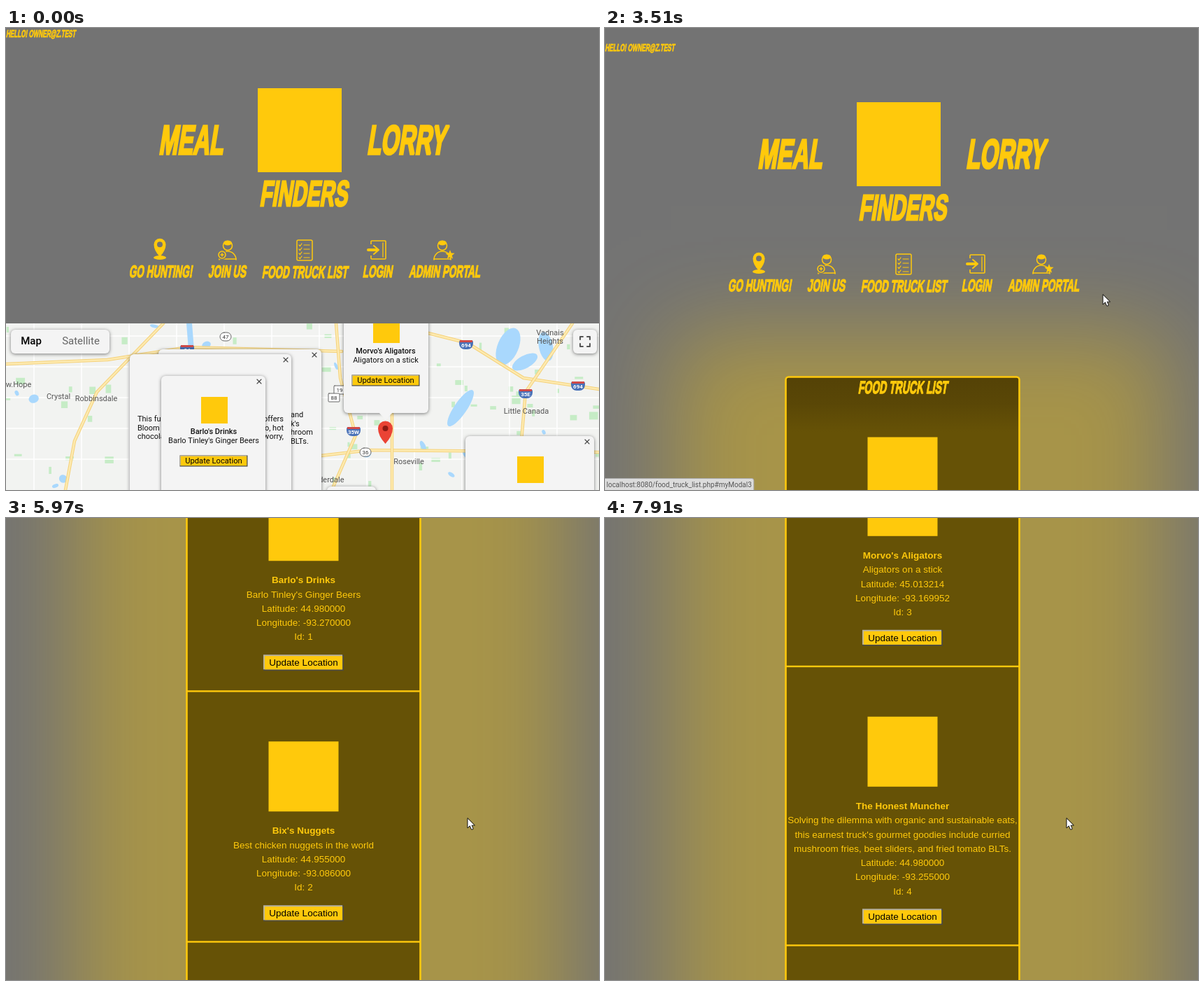
An HTML page with a canvas for the animation above (8 s loop, 848x660 px).

```html
<!DOCTYPE html>
<html lang="en">
<head>
<meta charset="utf-8">
<title>Truck list</title>
<style>
html, body { margin: 0; width: 100%; height: 100%; overflow: hidden; background: #737373; }
canvas { display: block; }
</style>
</head>
<body>
<canvas id="stage" width="848" height="660"></canvas>
<script>
const ctx = document.getElementById('stage').getContext('2d');
const W = 848, H = 660, LOOP = 8000, MAP_TOP = 422;
const YELLOW = '#ffc90c', GREY = '#737373', PAPER = '#f4f4f4', WATER = '#a9d8fd';
const SANS = '"Liberation Sans", Arial, sans-serif';
const UI = 'Roboto, sans-serif';

const trucks = [
  { name: "Barlo's Drinks", about: ["Barlo Tinley's Ginger Beers"], at: '44.980000 -93.270000' },
  { name: "Bix's Nuggets", about: ['Best chicken nuggets in the world'], at: '44.955000 -93.086000' },
  { name: "Morvo's Aligators", about: ['Aligators on a stick'], at: '45.013214 -93.169952' },
  { name: 'The Honest Muncher', about: ['Solving the dilemma with organic and sustainable eats,',
    "this earnest truck's gourmet goodies include curried",
    'mushroom fries, beet sliders, and fried tomato BLTs.'], at: '44.980000 -93.255000' },
  { name: 'Coffee Cart', about: ['Hot drinks all day'], at: '44.970000 -93.260000' }
];

// Each turn of the wheel eases the page on by one step.
const wheelTurns = [4150, 4640, 5270, 5886, 6519, 6990, 7600];
const TURN_MS = 400, TURN_PX = 200;

const cursorStops = [
  { t: 310, x: 624, y: 432 }, { t: 1460, x: 412, y: 340 }, { t: 3040, x: 412, y: 340 },
  { t: 3510, x: 712, y: 381 }, { t: 4150, x: 660, y: 429 }
];

function smooth(p) {
  p = Math.min(1, Math.max(0, p));
  return p * p * (3 - 2 * p);
}

function scrollAt(t) {
  return wheelTurns.reduce((sum, start) => sum + TURN_PX * smooth((t - start) / TURN_MS), 0);
}

function cursorAt(t) {
  const next = cursorStops.findIndex(stop => stop.t > t);
  if (next < 0) return cursorStops.at(-1);
  const a = cursorStops[next - 1], b = cursorStops[next];
  const p = smooth((t - a.t) / (b.t - a.t));
  return { x: a.x + (b.x - a.x) * p, y: a.y + (b.y - a.y) * p };
}

function seeded(seed) {
  return (lo, hi) => {
    seed = seed * 16807 % 2147483647;
    return lo + (hi - lo) * seed / 2147483647;
  };
}

function rect(x, y, w, h, color) {
  ctx.fillStyle = color;
  ctx.fillRect(x, y, w, h);
}

function square(cx, top, size) {
  rect(cx - size / 2, top, size, size, YELLOW);
}

function box(x, y, w, h, r, fill, stroke, width = 1) {
  ctx.beginPath();
  ctx.roundRect(x, y, w, h, r);
  if (fill) { ctx.fillStyle = fill; ctx.fill(); }
  if (stroke) { ctx.strokeStyle = stroke; ctx.lineWidth = width; ctx.stroke(); }
}

function line(color, width, ...points) {
  ctx.beginPath();
  points.forEach(([x, y]) => ctx.lineTo(x, y));
  ctx.strokeStyle = color;
  ctx.lineWidth = width;
  ctx.lineJoin = ctx.lineCap = 'round';
  ctx.stroke();
}

function disc(x, y, rx, ry, fill, turn = 0) {
  ctx.beginPath();
  ctx.ellipse(x, y, rx, ry, turn, 0, 7);
  ctx.fillStyle = fill;
  ctx.fill();
}

function ring(x, y, r, from = 0, to = 7) {
  ctx.beginPath();
  ctx.arc(x, y, r, from, to);
  ctx.strokeStyle = YELLOW;
  ctx.lineWidth = 1.6;
  ctx.stroke();
}

function text(s, x, y, font, color, align = 'center') {
  ctx.font = font;
  ctx.fillStyle = color;
  ctx.textAlign = align;
  ctx.textBaseline = 'middle';
  ctx.fillText(s, x, y);
}

// Heavy, condensed, slanted display lettering.
function display(s, x, y, size, align = 'center') {
  ctx.save();
  ctx.transform(0.56, 0, -0.16, 1, x, y + size * 0.36);
  ctx.font = `bold ${size}px ${SANS}`;
  ctx.fillStyle = ctx.strokeStyle = YELLOW;
  ctx.lineWidth = size * 0.06;
  ctx.lineJoin = 'miter';
  ctx.miterLimit = 2;
  ctx.textAlign = align;
  ctx.textBaseline = 'alphabetic';
  ctx.strokeText(s, 0, 0);
  ctx.fillText(s, 0, 0);
  ctx.restore();
}

function button(cx, cy, w, h, size, font) {
  const x = cx - w / 2, y = cy - h / 2, edge = h / 12;
  rect(x, y, w, h, '#4d4a3f');
  rect(x, y, w - edge, h - edge, '#b9b29a');
  rect(x + edge, y + edge, w - 2 * edge, h - 2 * edge, YELLOW);
  text('Update Location', cx, cy + 0.5, `${size}px ${font}`, '#000');
}

function pin(x, tip, r, fill, hole, holeSize) {
  const head = tip - r * 2.1;
  ctx.beginPath();
  ctx.moveTo(x, tip);
  ctx.quadraticCurveTo(x - r, head + r, x - r, head);
  ctx.arc(x, head, r, Math.PI, 0);
  ctx.quadraticCurveTo(x + r, head + r, x, tip);
  ctx.fillStyle = fill;
  ctx.fill();
  disc(x, head, holeSize, holeSize, hole);
}

function person(x, y) {
  ring(x, y - 6, 6.5);
  disc(x, y - 10, 6, 3.5, YELLOW);
  ring(x, y + 14, 12, Math.PI, 0);
  line(YELLOW, 1.6, [x - 12, y + 13], [x + 12, y + 13]);
}

function star(x, y, r) {
  ctx.beginPath();
  for (let i = 0; i < 10; i++) {
    const a = i * Math.PI / 5 - Math.PI / 2, reach = i % 2 ? r * 0.42 : r;
    ctx.lineTo(x + reach * Math.cos(a), y + reach * Math.sin(a));
  }
  ctx.fillStyle = YELLOW;
  ctx.fill();
}

function icons(y) {
  disc(220, y + 11, 9, 3, YELLOW);
  pin(220, y + 10, 8.5, YELLOW, GREY, 4);

  person(317, y);
  disc(309, y + 7, 7, 7, GREY);
  ring(309, y + 7, 5);
  line(YELLOW, 1.6, [307, y + 7], [311, y + 7]);
  line(YELLOW, 1.6, [309, y + 5], [309, y + 9]);

  box(416, y - 14, 22, 29, 2, null, YELLOW, 1.5);
  for (let row = y - 7; row < y + 14; row += 6) {
    line(YELLOW, 1.2, [419, row], [420.5, row + 1.5], [423, row - 2]);
    line(YELLOW, 1.2, [426, row], [434, row]);
  }

  box(522, y - 13, 21, 26, 1, null, YELLOW, 1.6);
  line(YELLOW, 1.3, [539, y - 10], [539, y + 10]);
  rect(515, y - 8, 12, 16, GREY);
  line(YELLOW, 4, [518, y], [530, y]);
  line(YELLOW, 2, [526, y - 6], [533, y], [526, y + 6]);

  person(624, y);
  star(635, y + 7, 7);
}

function nav(y) {
  display('GO HUNTING!', 221, y, 24);
  display('JOIN US', 316, y, 24);
  display('FOOD TRUCK LIST', 427, y + 1, 24);
  display('LOGIN', 531, y, 24);
  display('ADMIN PORTAL', 627, y, 24);
}

function hello(y) {
  display('HELLO! OWNER@Z.TEST', 0, y, 14.5, 'left');
}

function header(top) {
  hello(top + 8);
  square(420, top + 86, 120);
  display('MEAL', 264, top + 159, 58);
  display('LORRY', 572, top + 159, 58);
  display('FINDERS', 425, top + 236, 51);
  icons(top + 317);
  nav(top + 347);
}

function shield(label, x, y) {
  box(x - 10, y - 7, 20, 13, [3, 3, 8, 8], '#4a72b8');
  rect(x - 9, y - 7, 18, 3, '#cf4a48');
  text(label, x, y + 1, `bold 8px ${UI}`, '#fff');
}

function roadSign(label, x, y, r) {
  box(x - 8, y - 6, 16, 12, r, '#fff', '#666');
  text(label, x, y + 0.5, `8px ${UI}`, '#333');
}

function highway(...points) {
  line('#f5d27b', 4.5, ...points);
  line('#fdeab0', 2.5, ...points);
}

function land() {
  const rand = seeded(11);
  rect(0, MAP_TOP, W, H - MAP_TOP, '#f2f3f1');
  for (let i = 0; i < 90; i++) {
    rect(rand(0, W), rand(MAP_TOP, H), rand(3, 13), rand(3, 12), '#c6ecc6');
  }
  for (let x = 40; x < W; x += 68) line('#fff', 1.5, [x, MAP_TOP], [x, H]);
  for (let y = 440; y < H; y += 44) line('#fff', 1.5, [0, y], [W, y]);
  for (let i = 0; i < 24; i++) {
    disc(rand(0, W), rand(MAP_TOP, H), rand(2, 8), rand(2, 7), WATER, rand(0, 3));
  }
  disc(718, 455, 15, 28, WATER, 0.4);
  disc(742, 477, 20, 9, WATER, -0.5);
  disc(772, 455, 10, 21, WATER, -0.2);
  disc(650, 543, 9, 31, WATER, 0.6);
  line(WATER, 8, [262, MAP_TOP], [265, 460]);
}

function roads() {
  highway([85, H], [98, 590], [130, 520], [225, MAP_TOP]);
  highway([0, 480], [145, 474], [260, 456], [480, 462]);
  highway([450, 611], [520, 603], [W, 606]);
  highway([466, H], [500, 582], [478, 500], [472, MAP_TOP]);
  highway([600, 435], [660, 450], [740, 500], [W, 516]);
  highway([810, MAP_TOP], [743, 520], [737, 590]);
  highway([552, H], [552, 540]);
}

function places() {
  const place = (s, x, y) => text(s, x, y, `11px ${UI}`, '#555');
  place('w.Hope', 18, 510);
  place('Crystal', 75, 527);
  place('Robbinsdale', 129, 530);
  place('Vadnais', 778, 436);
  place('Heights', 778, 448);
  place('Little Canada', 744, 548);
  place('Roseville', 576, 620);
  place('lderdale', 464, 646);
  shield('694', 658, 453);
  shield('694', 818, 512);
  shield('35E', 743, 523);
  shield('35W', 497, 577);
  shield('94', 259, 460);
  roadSign('47', 314, 441, 6);
  roadSign('36', 514, 606, 6);
  roadSign('19', 477, 517, 1);
  roadSign('88', 469, 528, 1);
}

function popup(x, y, w, h, closeX) {
  ctx.save();
  ctx.shadowColor = 'rgba(0,0,0,.5)';
  ctx.shadowBlur = 5;
  ctx.shadowOffsetY = 1;
  box(x, y, w, h, 6, PAPER);
  ctx.restore();
  if (closeX) {
    line('#444', 1.1, [closeX - 3, y + 5], [closeX + 3, y + 11]);
    line('#444', 1.1, [closeX + 3, y + 5], [closeX - 3, y + 11]);
  }
}

function paragraph(rows, x, y, align) {
  rows.forEach((row, i) => text(row, x, y + i * 12.5, `11px ${UI}`, '#111', align));
}

function card(cx, top, { name, about }) {
  square(cx + 1, top + 16, 38);
  text(name, cx, top + 66, `500 11px ${UI}`, '#111');
  text(about[0], cx, top + 79, `11px ${UI}`, '#111');
  button(cx, top + 107.5, 97, 16, 11.2, UI);
}

function popups() {
  popup(218, 459, 233, 230, 441);
  paragraph(['and', "k's", 'hroom', 'BLTs.'], 407, 553, 'left');
  popup(177, 466, 231, 230, 400);
  paragraph(['This full', 'Bloom c', 'chocolate'], 188, 559, 'left');
  paragraph(['offers', 'o, hot', 'worry,'], 397, 559, 'right');
  popup(222, 497, 149, 230, 362);
  card(297, 511, trucks[0]);

  popup(483, 380, 121, 170);
  ctx.beginPath();
  ctx.moveTo(533, 549);
  ctx.lineTo(543, 560);
  ctx.lineTo(553, 549);
  ctx.fillStyle = PAPER;
  ctx.fill();
  card(543, 396, trucks[2]);
  pin(542.5, 594, 10.5, '#ea4335', '#8c1a14', 4);

  popup(657, 583, 184, 150, 831);
  square(750, 612, 38);
  popup(459, 655, 70, 60);
}

function mapControls() {
  popup(7, 431, 141, 34);
  text('Map', 36, 448, `500 15px ${UI}`, '#000');
  text('Satellite', 107, 448, `15px ${UI}`, '#666');
  popup(811, 431, 34, 34);
  for (const a of [-1, 1]) for (const b of [-1, 1]) {
    const x = 828 + a * 7, y = 448 + b * 7;
    line('#555', 2, [x - a * 4, y], [x, y], [x, y - b * 4]);
  }
}

function mapView() {
  ctx.save();
  ctx.beginPath();
  ctx.rect(0, MAP_TOP, W, H - MAP_TOP);
  ctx.clip();
  land();
  roads();
  places();
  popups();
  mapControls();
  ctx.restore();
}

// The caster stands off stage, so that only its soft shadow shows.
function glow(x, top, bottom) {
  const y = Math.max(top, -400);
  ctx.save();
  ctx.shadowColor = 'rgba(255,204,0,.37)';
  ctx.shadowBlur = 120;
  ctx.shadowOffsetX = 2000;
  rect(x - 2000, y, 708, Math.min(bottom, 1100) - y, '#000');
  ctx.restore();
}

function panel(x, top, height) {
  glow(x - 162, top - 62, top + height + 350);
  const shade = ctx.createLinearGradient(0, top, 0, top + 80);
  shade.addColorStop(0, '#544206');
  shade.addColorStop(0.5, '#5a4706');
  shade.addColorStop(1, '#665206');
  box(x + 1.5, top + 1.5, 334, height - 3, 4, shade, YELLOW, 2.6);
  display('FOOD TRUCK LIST', x + 168.5, top + 16, 25);
}

function truckList(top) {
  const cx = 425.5, size = 13.5, pitch = size * 1.5;
  panel(257, top, 2600);
  let y = top + 15.5;
  trucks.forEach(({ name, about, at }, i) => {
    const [lat, long] = at.split(' ');
    const rows = [...about, 'Latitude: ' + lat, 'Longitude: ' + long, 'Id: ' + (i + 1)];
    if (i) rect(258, y - 1, 335, 2.4, YELLOW);
    square(cx, y + 72, 100);
    text(name, cx, y + 200.5, `bold ${size}px ${SANS}`, YELLOW);
    rows.forEach((row, k) => text(row, cx, y + 200.5 + (k + 1) * pitch, `${size}px ${SANS}`, YELLOW));
    const last = y + 200 + rows.length * pitch;
    button(cx, last + 36.5, 115, 23, size, SANS);
    y = last + 77;
  });
}

function status(s) {
  ctx.font = `10px ${UI}`;
  box(-2, 643.5, ctx.measureText(s).width + 7, 20, [0, 3, 0, 0], '#dcdcdc', '#a8a8a8');
  text(s, 2, 653, `10px ${UI}`, '#555', 'left');
}

function pointer({ x, y }) {
  line('#111', 4, [x + 4, y + 9], [x + 6.5, y + 14.5]);
  ctx.beginPath();
  ctx.moveTo(x, y);
  ctx.lineTo(x, y + 14);
  ctx.lineTo(x + 3.7, y + 10.4);
  ctx.lineTo(x + 10, y + 10);
  ctx.closePath();
  ctx.fillStyle = '#fff';
  ctx.fill();
  ctx.lineWidth = 1;
  ctx.stroke();
  line('#fff', 2, [x + 4, y + 9], [x + 6.5, y + 14.5]);
}

function homePage(t) {
  header(0);
  mapView();
  if (t >= 2160) status('Waiting for localhost...');
  else if (t >= 1150) status('localhost:8080/food_truck_list.php');
}

function loadingPage(t) {
  if (t < 2400) return;
  if (t < 2570) return panel(264.5, 72, 41);
  truckList(244);
  hello(28);
  icons(83);
  if (t >= 2720) nav(113);
}

function listPage(t) {
  const scroll = scrollAt(t);
  truckList(497 - scroll);
  header(20 - scroll);
  if (t >= 3350 && t < 4080) status('localhost:8080/food_truck_list.php#myModal3');
}

function draw(t) {
  rect(0, 0, W, H, GREY);
  if (t < 2330) homePage(t);
  else if (t < 3040) loadingPage(t);
  else listPage(t);

  if (t >= 310) pointer(cursorAt(t));
  else if (t >= 70 && t < 140) pointer({ x: 759, y: 657 });
}

function frame() {
  draw(performance.now() % LOOP);
  requestAnimationFrame(frame);
}
frame();
</script>
</body>
</html>
```
